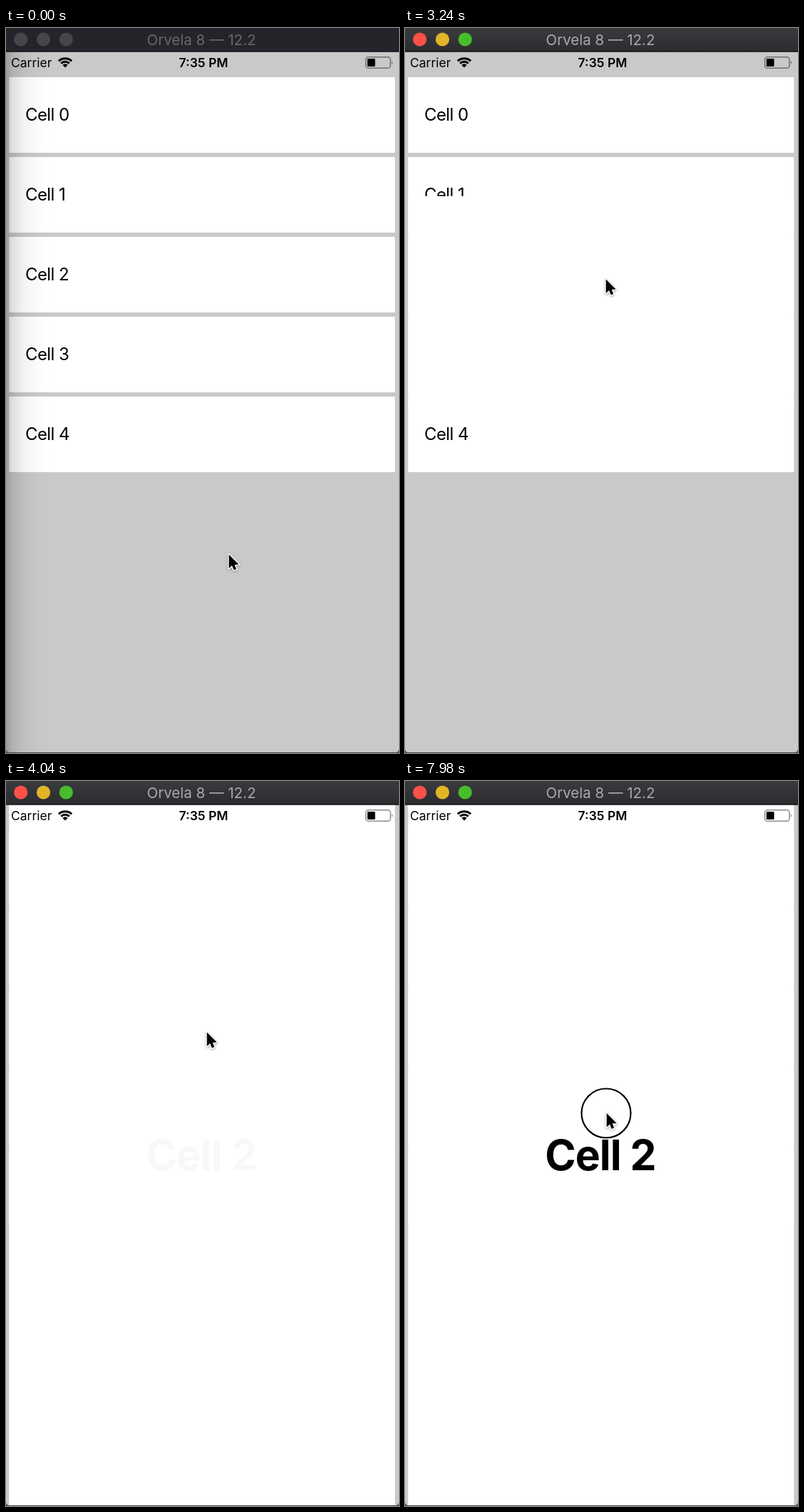
An HTML page for the animation above (8000 ms loop, 551 by 1017 pixels).

```html
<!DOCTYPE html>
<html lang="en">
<head>
<meta charset="utf-8">
<title>Cell expansion</title>
<style>
  html, body { margin: 0; width: 100%; height: 100%; overflow: hidden; background: #c9c9c9; }
  svg { display: block; width: 551px; height: 1017px; }
  text { font-family: Inter, "Open Sans", sans-serif; fill: #000; }
  .title { font-size: 20.5px; text-anchor: middle; }
  .status { font-size: 17.5px; }
  .time { font-weight: 600; text-anchor: middle; }
  .label { font-size: 24px; letter-spacing: -.6px; }
  .big { font-size: 58.8px; font-weight: 700; letter-spacing: -1px; text-anchor: middle; }
  #cursor { filter: drop-shadow(0 1.5px 1.5px rgba(0, 0, 0, .35)); }
</style>
</head>
<body>
<svg viewBox="0 0 551 1017">
  <defs>
    <linearGradient id="shade">
      <stop offset="0" stop-opacity=".23"/>
      <stop offset=".15" stop-opacity=".12"/>
      <stop offset=".4" stop-opacity=".05"/>
      <stop offset=".7" stop-opacity=".015"/>
      <stop offset="1" stop-opacity="0"/>
    </linearGradient>
    <linearGradient id="barOn" x2="0" y2="1">
      <stop offset="0" stop-color="#3a3b3e"/>
      <stop offset="1" stop-color="#2b2c2f"/>
    </linearGradient>
  </defs>

  <rect width="551" height="1017" fill="#c9c9c9"/>
  <g id="cells"></g>
  <g id="statusLow"></g>
  <rect id="card" x="4.3" width="541" fill="#fff"/>
  <g id="statusTop"></g>
  <text id="detail" class="big" x="274" y="546">Cell 2</text>

  <rect id="shadow" y="33" width="62" height="984" fill="url(#shade)"/>
  <path d="M0 1011V1017H551V1011Q551 1016 546 1016H5Q0 1016 0 1011Z" fill="#4a4a4c"/>

  <rect id="bar" width="551" height="33"/>
  <rect y="32.5" width="551" height="1.2" fill="#08080a"/>
  <g id="lights"></g>
  <text id="title" class="title" x="274" y="24">Orvela 8 — 12.2</text>

  <circle id="ring" r="34.5" fill="none" stroke="#000" stroke-width="2.2"/>
  <path id="cursor" d="M0 0V19.5L4.4 15.5L7 22L10.5 20.5L8 14.6L14 14Z"
        stroke="#fff" stroke-width="3" stroke-linejoin="round" paint-order="stroke"/>
</svg>

<script>
const LOOP = 8000;
const $ = id => document.getElementById(id);
const show = (id, on) => $(id).setAttribute('visibility', on ? 'visible' : 'hidden');

// Static parts
$('cells').innerHTML = [0, 1, 2, 3, 4].map(i => {
  const y = 69 + i * 112;
  return `<rect x="4.3" y="${y}" width="541" height="106" fill="#fff"/>
    <text class="label" x="27" y="${y + 61}">Cell ${i}</text>`;
}).join('');

const wave = r => {
  const d = r * 0.7;
  return `<path d="M${83 - d} ${55.5 - d}A${r} ${r} 0 0 1 ${83 + d} ${55.5 - d}"
    fill="none" stroke="#000" stroke-width="3"/>`;
};
const status = `
  <text class="status" x="7" y="55">Carrier</text>
  ${wave(13)}${wave(8.3)}
  <path d="M83 55.5L79.4 51.9A5 5 0 0 1 86.6 51.9Z"/>
  <text class="status time" x="277" y="55">7:35 PM</text>
  <rect x="504.5" y="40.7" width="34.5" height="15.6" rx="3.6" fill="none" stroke="#000" stroke-opacity=".45" stroke-width="1.5"/>
  <rect x="506.7" y="43" width="10.8" height="11" rx="1"/>
  <path d="M540.8 46Q543.2 48.5 540.8 51Z" fill-opacity=".5"/>`;
$('statusLow').innerHTML = $('statusTop').innerHTML = status;

const LIGHTS = ['#fe5049', '#e2b427', '#47bd2c'];
$('lights').innerHTML = LIGHTS.map((c, i) =>
  `<circle cx="${20.7 + i * 31.8}" cy="16" r="9.6"/>`).join('');

// Pointer strokes: start, end, number of steps, cubic path points
const MOVES = [
  [20, 540, 10, [312.5, 738.5], [304, 610], [325, 400], [315, 346]],
  [700, 1240, 12, [315, 346], [309, 346], [299, 350], [291.5, 350]],
  [1520, 2080, 11, [291.5, 350], [288, 350], [284, 352], [281.7, 352.5]],
  [5620, 6160, 12, [281.7, 352.5], [278, 390], [279, 430], [282.7, 466]],
];
// Card growth: time, share of the way
const GROWTH = [
  [3200, .08], [3240, .22], [3280, .36], [3320, .48], [3380, .615],
  [3480, .75], [3520, .795], [3560, .835], [3600, .872], [3660, .919],
  [3760, .96], [3800, .975], [3840, .987], [3860, .993], [3900, 1],
];

const ease = k => k * k * (3 - 2 * k);

function stepped(t, from, to, n) {
  if (t < from) return 0;
  const k = Math.floor((t - from) / (to - from) * (n - 1) + 1e-6) + 1;
  return ease(Math.min(k, n) / n);
}

function pointer(t) {
  const move = MOVES.filter(m => t >= m[0]).pop() || MOVES[0];
  const [from, to, n, a, b, c, d] = move;
  const k = stepped(t, from, to, n), j = 1 - k;
  return [0, 1].map(i =>
    j * j * j * a[i] + 3 * j * j * k * b[i] + 3 * j * k * k * c[i] + k * k * k * d[i]);
}

function draw(t) {
  const active = t >= 2820;
  $('bar').setAttribute('fill', active ? 'url(#barOn)' : '#24252a');
  $('title').style.fill = active ? '#a9a9ab' : '#68686b';
  [...$('lights').children].forEach((dot, i) =>
    dot.setAttribute('fill', active ? LIGHTS[i] : '#46464a'));
  show('shadow', t < 2780);

  const grown = GROWTH.filter(g => t >= g[0]).pop();
  const p = grown ? grown[1] : 0;
  const top = 293 - 260 * p, bottom = 399 + 617 * p;
  $('card').setAttribute('y', top);
  $('card').setAttribute('height', bottom - top);
  show('card', p > 0);
  show('statusTop', p === 1);
  $('detail').style.opacity = stepped(t, 4040, 4500, 11);

  const [x, y] = pointer(t);
  $('cursor').setAttribute('transform', `translate(${x} ${y})`);
  $('ring').setAttribute('cx', x - .7);
  $('ring').setAttribute('cy', y);
  show('ring', (t >= 2780 && t < 3060) || t >= 7980);
}

const start = performance.now();
function tick() {
  draw((performance.now() - start) % LOOP);
  requestAnimationFrame(tick);
}
tick();
</script>
</body>
</html>
```
